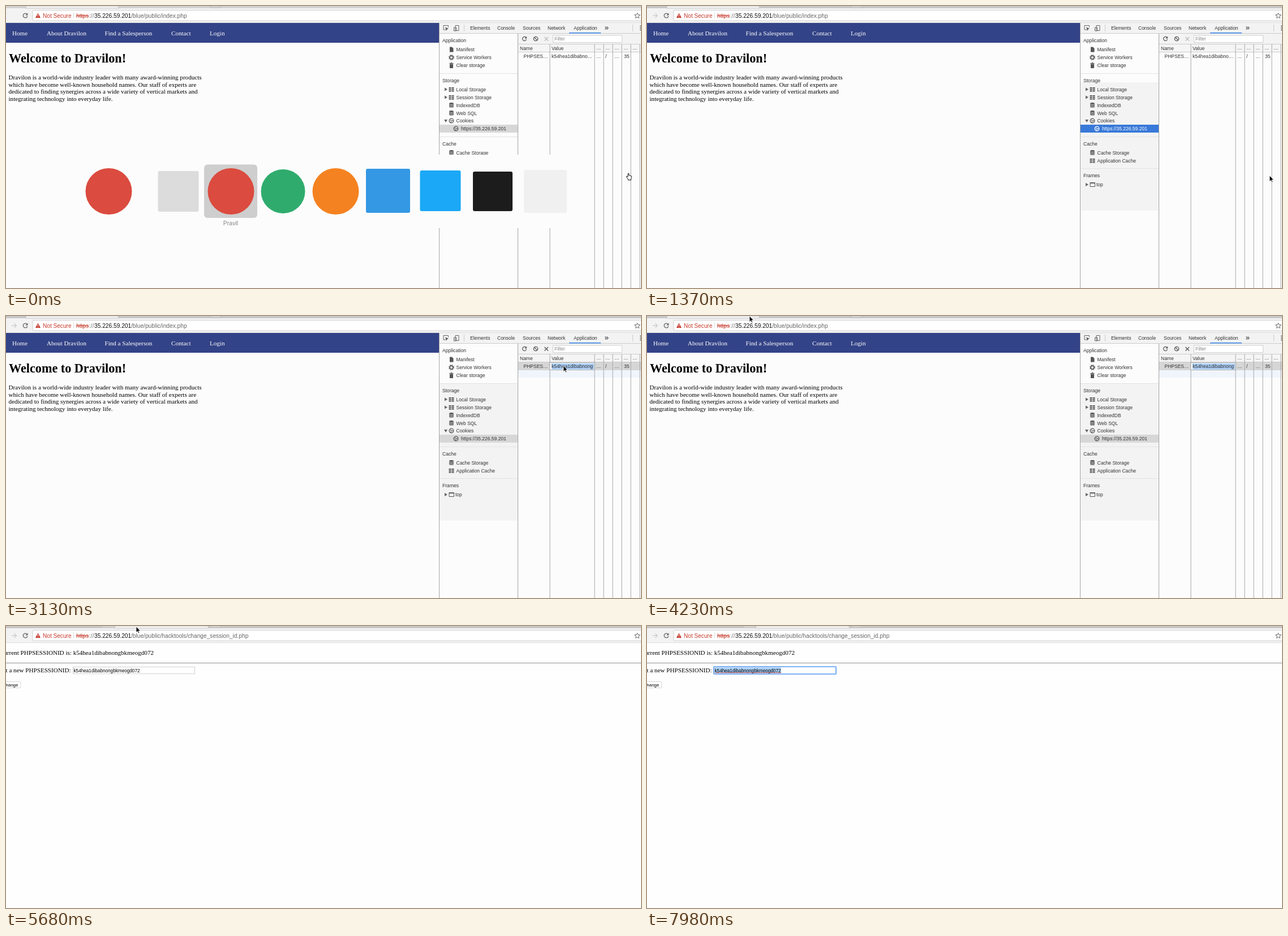
An HTML page that plays this animation: 1122 by 499 pixels, repeating every 8 s.

```html
<!DOCTYPE html>
<html lang="en">
<head>
<meta charset="utf-8">
<title>Session change</title>
<style>
html, body { margin: 0; width: 100%; height: 100%; overflow: hidden; background: #fcfcfc; }
svg { display: block; width: 1122px; height: 499px; }
text { white-space: pre; }
.sans { font-family: "Liberation Sans", Arial, sans-serif; }
.serif { font-family: "Liberation Serif", Times, serif; font-size: 11.1px; }
</style>
</head>
<body>
<svg id="stage" viewBox="0 0 1122 499"></svg>
<script>
const LOOP = 8000;
const SESSION = "k54hea1dibabnongbkmeogd072";
const HOST = "35.226.59.201";

const rect = (x, y, w, h, fill, extra = "") =>
  `<rect x="${x}" y="${y}" width="${w}" height="${h}" fill="${fill}" ${extra}/>`;
const path = (d, fill = "none", stroke = "none", width = 1) =>
  `<path d="${d}" fill="${fill}" stroke="${stroke}" stroke-width="${width}"/>`;
const circle = (x, y, r, fill, extra = "") => `<circle cx="${x}" cy="${y}" r="${r}" fill="${fill}" ${extra}/>`;
const sans = (s, x, y, size = 8.5, fill = "#333", extra = "") =>
  `<text class="sans" x="${x}" y="${y}" font-size="${size}" fill="${fill}" ${extra}>${s}</text>`;
const serif = (s, x, y, fill = "#000", extra = "") =>
  `<text class="serif" x="${x}" y="${y}" fill="${fill}" ${extra}>${s}</text>`;
const group = (id, body, extra = "") => `<g id="${id}" ${extra}>${body}</g>`;
const vline = (x, y1, y2, color = "#a5a5a5") => rect(x, y1, 1, y2 - y1, color);

// Icons are drawn around their own centre.
const icons = {
  doc: c => path("M-3-4.5h4l2.5 2.5v6.5h-6.5z", c),
  gear: c => circle(0, 0, 2.8, "none", `stroke="${c}" stroke-width="1.7"`) +
    circle(0, 0, 4.2, "none", `stroke="${c}" stroke-width="1.6" stroke-dasharray="1.65"`),
  trash: c => path("M-3.5-4h2l.5-1h2l.5 1h2v1.4h-7zM-3-2h6v7h-6z", c),
  table: c => [-3.5, -.7, 2.1].map(y => rect(-4.5, y, 4, 2, c) + rect(.5, y, 4, 2, c)).join(""),
  db: c => path("M-4-3c0-2 8-2 8 0v6c0 2-8 2-8 0z", c) +
    path("M-4-2.4c0 1.7 8 1.7 8 0M-4 0c0 1.7 8 1.7 8 0M-4 2.4c0 1.7 8 1.7 8 0", "none", "#f3f3f3", .8),
  cookie: c => circle(0, 0, 3.8, "none", `stroke="${c}" stroke-width="1.3"`) +
    circle(-1.3, -1, 1, c) + circle(1.4, .2, 1.1, c) + circle(-.8, 1.9, .9, c),
  frame: c => path("M-4-3.5h8.5v7h-8.5zM-4-2.2h8.5", "none", c),
  reload: c => path("M2.8-2.6A3.7 3.7 0 1 0 3.7 1", "none", c, 1.3) + path("M4.3-4.5v4h-4z", c),
};
const icon = (name, x, y, color = "#555", scale = 1) =>
  `<g transform="translate(${x} ${y}) scale(${scale})">${icons[name](color)}</g>`;

function toolbar() {
  return rect(0, 0, 1122, 30, "#f3f3f3") +
    group("strip", rect(0, 0, 1122, 4, "#c8c8c8")) +
    group("homeTab", path("M34 4l2-4h161l3 4z", "#f3f3f3", "#aaa", .6)) +
    group("hackTab", path("M191 4l2-4h163l3 4z", "#f3f3f3", "#aaa", .6) + rect(171, 0, 20, 3, "#d3d3d3")) +
    path("M360 0l2 3h17l1-3z", "#d8d8d8", "#aaa", .6) +
    rect(0, 29, 1122, 1, "#dedede") +
    group("forward", path("M10 17h8M14.5 13l4 4l-4 4", "none", "#cecece", 1.3)) +
    icon("reload", 34, 17, "#686868", 1.05) +
    `<rect id="urlBox" x="47" y="7.5" width="1085" height="18.5" rx="2" fill="#fff"/>` +
    path("M56.5 12.5l4.5 8.5h-9z", "#c5392b") + rect(56, 15.3, 1, 2.8, "#fff") + rect(56, 19, 1, 1, "#fff") +
    sans("Not Secure", 65, 20.5, 10.1, "#c5392b") + vline(119, 11, 22, "#ddd") +
    group("urlMark", rect(124, 11, 303, 12, "#a9cdf5")) +
    sans("https", 124, 20.5, 10.2, "#c5392b", 'text-decoration="line-through"') +
    sans("://", 147, 20.5, 10.2, "#777") + sans(HOST, 156, 20.5, 10.2, "#111") +
    sans("", 221, 20.5, 10.2, "#666", 'id="urlPath"') +
    path("M1115.500 12.300l1.400 3.200l3.500.3l-2.700 2.300l.8 3.400l-3-1.800l-3 1.800l.8-3.400l-2.700-2.300l3.500-.3z", "none", "#666", 1);
}

function sitePage() {
  const nav = [["Home", 11], ["About Dravilon", 72], ["Find a Salesperson", 174.5], ["Contact", 292], ["Login", 360]];
  const copy = ["Dravilon is a world-wide industry leader with many award-winning products",
    "which have become well-known household names. Our staff of experts are",
    "dedicated to finding synergies across a wide variety of vertical markets and",
    "integrating technology into everyday life."];
  return rect(0, 30, 765, 469, "#fcfcfc") + rect(0, 30, 765, 35, "#334387") +
    nav.map(([s, x]) => serif(s, x, 51.5, "#fff")).join("") +
    serif("Welcome to Dravilon!", 5, 99.500, "#000", 'style="font-size:22.2px;font-weight:bold"') +
    copy.map((s, i) => serif(s, 4.5, 130 + i * 12.55)).join("");
}

function sidebar() {
  const heads = [["Application", 64], ["Storage", 134.500], ["Cache", 246.500], ["Frames", 303]];
  const items = [["doc", "Manifest", 77], ["gear", "Service Workers", 91], ["trash", "Clear storage", 105],
    ["table", "Local Storage", 147.500, 1], ["table", "Session Storage", 161.500, 1], ["db", "IndexedDB", 175.500],
    ["db", "Web SQL", 189.500], ["cookie", "Cookies", 203, 2], ["db", "Cache Storage", 259.500],
    ["table", "Application Cache", 273.500], ["frame", "top", 316, 1]];
  const arrows = ["", "M775-3l5 3l-5 3z", "M774-2h6l-3 5z"];
  return group("shade", rect(766, 0, 138, 362, "#f3f3f3")) +
    [119, 231, 287].map(y => rect(766, y, 138, 1, "#e3e3e3")).join("") +
    heads.map(([s, y]) => sans(s, 771, y, 8.6)).join("") +
    items.map(([kind, s, y, arrow]) => icon(kind, 787, y) + sans(s, kind === "frame" ? 794 : 795.5, y + 3) +
      (arrow ? `<g transform="translate(0 ${y})">${path(arrows[arrow], "#666")}</g>` : "")).join("") +
    group("pickGrey", rect(766, 210, 138, 14, "#d7d7d7") + icon("cookie", 795, 217) +
      sans("https://" + HOST, 804, 220)) +
    group("pickBlue", rect(766, 210, 138, 14, "#3879d9") + icon("cookie", 795, 217, "#fff") +
      sans("https://" + HOST, 804, 220, 8.5, "#fff"));
}

function cookieTable() {
  const columns = [1040, 1056, 1072, 1088, 1104];
  return rect(905, 68, 217, 14, "#f5f5f5") + rect(905, 67, 217, 1, "#ccc") +
    group("stripeSmall", rect(905, 102, 56, 7, "#f0f5fc")) +
    group("stripe", rect(905, 96, 217, 13, "#f0f5fc")) +
    group("rowPick", rect(905, 82, 217, 14, "#d6d6d6")) +
    rect(905, 81, 217, 1, "#ccc") +
    sans("Name", 908, 77.500) + sans("Value", 964, 77.500) +
    sans("PHPSES…", 914.5, 92) + sans(SESSION.slice(0, 14) + "…", 964, 92, 8.6) +
    columns.map(x => sans("…", x + 3, 77)).join("") +
    sans("…", 1043, 92) + sans("/", 1059, 92) + sans("…", 1075, 92) + sans("35", 1092, 92) +
    [961, ...columns, 1120].map(x => vline(x - .5, 68, 499)).join("") +
    group("editor", rect(961, 82.500, 79, 13, "#fff", 'stroke="#aaa"') + rect(964, 84, 75, 10.500, "#a9cdf5") +
      sans(SESSION.slice(0, 16), 964, 92, 8.6) + "");
}

function devtools() {
  const tabs = [["Elements", 820], ["Console", 868], ["Sources", 913], ["Network", 957], ["Application", 1003]];
  return rect(765, 30, 357, 469, "#fcfcfc") + rect(765, 30, 357, 18, "#f3f3f3") + rect(765, 48, 357, 1, "#ccc") +
    path("M779 42h-6v-7.500h8.500v3", "none", "#666") + path("M776 37.500l6 2.500l-2.500 1l-1 2.500z", "#555") +
    path("M794 34.500h6v9h-6zM791.500 38h4v6h-4z", "#f3f3f3", "#666") + vline(809, 33, 45, "#ccc") +
    tabs.map(([s, x]) => sans(s, x, 42)).join("") + rect(995, 46.800, 56, 1.800, "#4a8ee8") +
    path("M1058.500 36.500l2.500 2.500l-2.500 2.500M1061.500 36.500l2.500 2.500l-2.500 2.500", "none", "#555", 1.2) +
    vline(1107, 33, 45, "#ccc") + [35.500, 39, 42.500].map(y => circle(1121, y, 1, "#555")).join("") +
    sidebar() + rect(905, 49, 217, 18, "#f3f3f3") + icon("reload", 916, 58, "#555", .95) +
    circle(936, 58, 3.7, "none", 'stroke="#555" stroke-width="1.3"') + path("M933.500 55.500l5 5", "none", "#555", 1.2) +
    `<path id="remove" d="M951.500 55l6.500 6.500M958 55l-6.500 6.500" stroke-width="1.3"/>` +
    rect(966.500, 52, 122, 12.500, "#fff", 'stroke="#d0d0d0"') + sans("Filter", 969, 61, 8.5, "#888") +
    cookieTable() + vline(765, 30, 499) + vline(904, 49, 499);
}

function sessionPage() {
  return rect(0, 30, 1122, 469, "#fefefe") +
    serif(`Current PHPSESSIONID is: ${SESSION}`, 261, 51, "#000", 'text-anchor="end"') +
    rect(0, 65, 1122, 1, "#929292") +
    serif("Set a new PHPSESSIONID:", 114.500, 81.500, "#000", 'text-anchor="end"') +
    rect(118.500, 72.500, 215, 12, "#fff", 'stroke="#d2d2d2"') +
    group("field", rect(118, 72, 216, 13, "#fff", 'rx="1" stroke="#7db1f3" stroke-width="2.2"') +
      rect(119.500, 73.500, 117.500, 10, "#a9cdf5")) +
    sans(SESSION, 119.500, 81.500, 8.2, "#000") +
    group("spelling", path("M120 82.800H237", "none", "#d65a5a", .9)) +
    rect(-16, 98.500, 42, 11, "#fff", 'rx="2" stroke="#d5d5d5"') +
    sans("Change", 21.500, 107, 8, "#000", 'text-anchor="end"') +
    group("tooltip", rect(128, 95, 96, 15, "#000", 'opacity=".12" rx="2"') +
      rect(128, 93.500, 96, 14, "#f3f3f3", 'stroke="#c4c4c4" rx="1.5"') +
      sans("Change PHPSESSIONID", 133, 103.300, 8.2, "#111"));
}

function switcher() {
  const tile = (id, x, label) => group(id, rect(x, 280.500, 94, 94.500, "#cecece", 'rx="6"') +
    sans(label, x + 47, 388, 10.5, "#858585", 'text-anchor="middle"'));
  const square = (x, y, side, fill) => rect(x - side / 2, y - side / 2, side, side, fill, 'rx="3"');
  return rect(96, 263, 932, 130, "#fcfcfc") +
    group("redrawn", rect(257, 280.500, 187, 110, "#f0f0f0")) +
    tile("pickLeft", 257, "Recorder") + tile("pickRight", 350, "Pravil") +
    circle(181.500, 328, 41, "#db4b3f") + square(304.500, 328, 72, "#dcdcdc") + circle(397.500, 328, 41, "#db4b3f") +
    circle(489.500, 328, 39, "#2fac6d") + circle(582.500, 328, 41, "#f58220") + square(675, 327, 78, "#3498e4") +
    square(767.500, 327, 72, "#1ba8f6") + square(860, 328, 70, "#1c1c1c") + square(953, 328, 76, "#f0f0f0");
}

const pointers = {
  arrow: path("M0 0v10.500l2.400-2.200l1.600 3.700l1.700-.7l-1.600-3.600h3.300z", "#000", "#fff", .8),
  hand: path("M-1-5.500v5.500l-2-1l-.8 1l3 4.500v1.500h5v-2l1-2.500v-2.500l-4.500-1.500v-3q-.8-1-1.700 0z", "#fff", "#111", 1),
  beam: path("M-2.500-5q2.500 0 2.500 1.500q0-1.500 2.500-1.500M0-4v8M-2.500 5q2.500 0 2.500-1.500q0 1.500 2.500 1.500M-1.200.8h2.400", "none", "#222", 1.1),
  resize: path("M-1.200-5h.9v10h-.9zM.4-5h.9v10h-.9zM-5.500 0l3-2.500v1.800h5v-1.800l3 2.500l-3 2.500v-1.800h-5v1.800z", "#000"),
};

// Cursor poses: start time, x, y, pointer.
const poses = [
  [0, 1100, 302, "hand"], [1370, 1100, 300, "arrow"], [1580, 1062, 240, "arrow"], [1790, 1005, 160, "arrow"],
  [1990, 976, 118, "arrow"], [2190, 966, 109, "resize"], [2510, 978, 92, "arrow"], [2670, 985, 88, "arrow"],
  [3430, 640, 72, "arrow"], [3570, 356, 48, "arrow"], [3900, 290, 32, "arrow"], [4060, 215, 12, "arrow"],
  [4230, 181, 0, "arrow"], [4370, 208, 1, "arrow"], [4520, 228, 1, "arrow"], [5290, 230, 1, "arrow"],
  [6130, 174, 29, "arrow"], [6400, 180, 18, "beam"], [6700, 132, 78, "beam"], [7000, 210, 82, "beam"],
  [7150, 257.500, 83, "beam"], [7980, -50, -50, "beam"],
];

document.getElementById("stage").innerHTML =
  toolbar() + group("home", sitePage() + devtools()) + group("hack", sessionPage()) +
  group("switcher", switcher()) + group("cursor", Object.keys(pointers).map(k => group(k, pointers[k])).join(""));

const $ = id => document.getElementById(id);
const show = (id, on) => $(id).setAttribute("display", on ? "inline" : "none");

function render(t) {
  const within = (a, b = LOOP) => t >= a && t < b;
  const active = t >= 1370, home = t < 5680, urlPicked = within(6400, 7300);

  show("switcher", !active);
  show("redrawn", t >= 590);
  show("pickLeft", within(590, 1160));
  show("pickRight", !within(590, 1160));

  show("home", home);
  show("hack", !home);
  show("homeTab", home);
  show("hackTab", !home);
  show("forward", active);
  $("strip").setAttribute("opacity", active ? 1 : .75);
  $("urlPath").textContent = home ? "/blue/public/index.php" : "/blue/public/hacktools/change_session_id.php";
  $("urlBox").setAttribute("stroke", urlPicked ? "#74a9e4" : "#d0d0d0");
  show("urlMark", urlPicked);

  const shadeTop = t >= 4860 ? 98 : t >= 2510 ? 119 : 135;
  const shade = $("shade").firstElementChild;
  shade.setAttribute("y", shadeTop);
  shade.setAttribute("height", 362 - shadeTop);
  show("shade", active);
  const rowPicked = t >= 2670;
  show("pickBlue", active && !rowPicked);
  show("pickGrey", !active || rowPicked);
  show("rowPick", rowPicked);
  show("stripe", rowPicked);
  show("stripeSmall", within(2190, 2670));
  show("editor", within(2980, 4860));
  $("remove").setAttribute("stroke", rowPicked ? "#555" : "#bbb");

  show("tooltip", within(6850, 7300));
  show("field", t >= 7510);
  show("spelling", t >= 7510);

  const [, x, y, shape] = poses.findLast(p => p[0] <= t);
  $("cursor").setAttribute("transform", `translate(${x} ${y})`);
  for (const name in pointers) show(name, name === shape);
}

const start = performance.now();
function tick() {
  render((performance.now() - start) % LOOP);
  requestAnimationFrame(tick);
}
tick();
</script>
</body>
</html>
```
